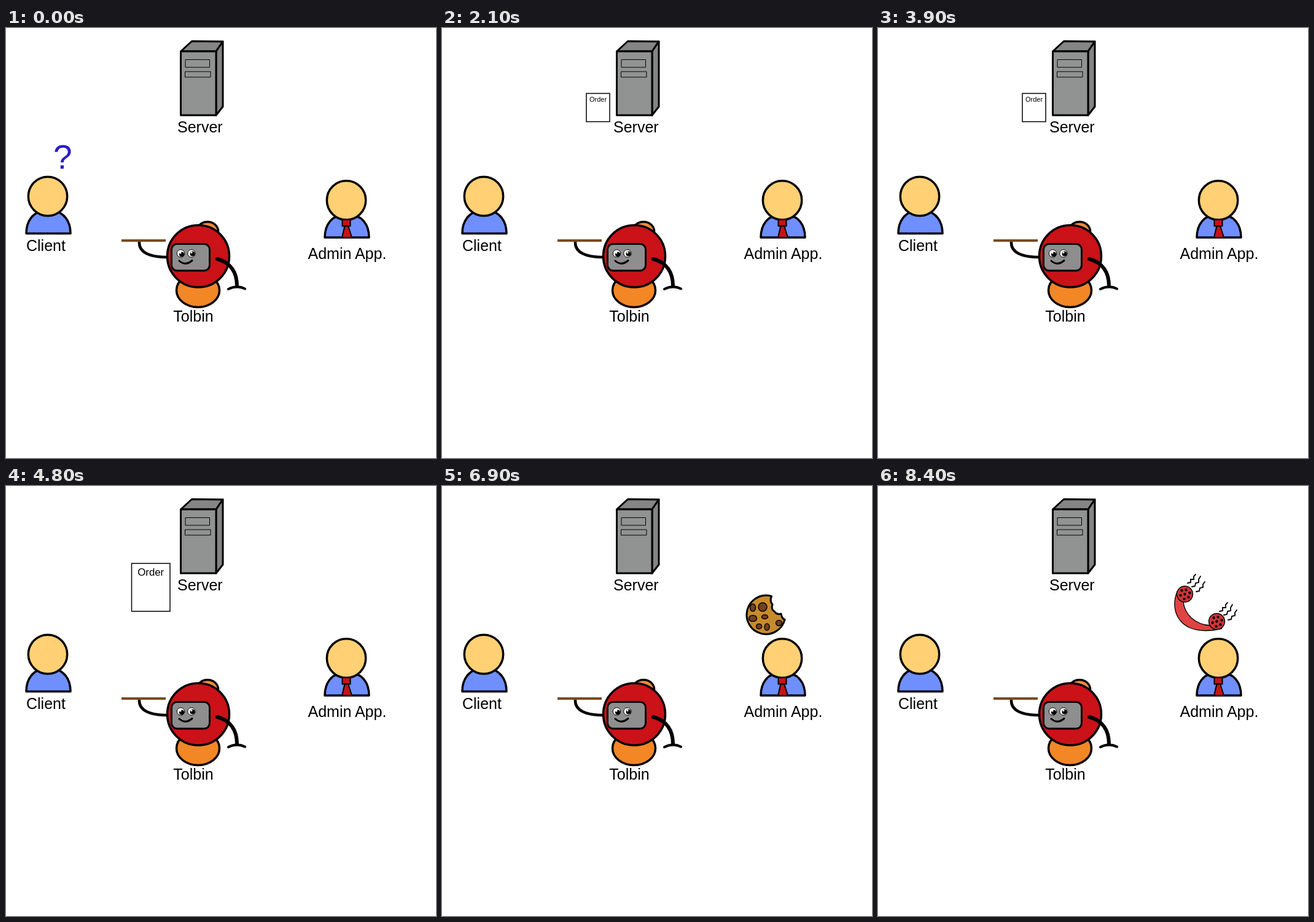
An HTML page for the animation above (8700 ms loop, 700x700 px).

```html
<!DOCTYPE html>
<html lang="en">
<head>
<meta charset="utf-8">
<title>Order service</title>
<style>
html, body { margin: 0; width: 100%; height: 100%; overflow: hidden; background: #fff; }
svg { display: block; width: 100vw; height: 100vh; }
text { font-family: "Liberation Sans", Arial, sans-serif; font-size: 25px; }
.ink { stroke: #000; stroke-width: 3.5; stroke-linejoin: round; }
.line { fill: none; stroke: #000; stroke-linecap: round; }
.thin { stroke: #000; stroke-width: 1.3; }
#ask { font-size: 55px; fill: #2a1ccb; }
</style>
</head>
<body>
<svg viewBox="0 0 700 700">
  <defs>
    <g id="person" class="ink">
      <path d="M33 334.5C33 316 42 297 69 297C96 297 105 316 105 334.5Z" fill="#6f8fff"/>
      <circle cx="68" cy="274" r="31.7" fill="#ffd074"/>
    </g>
    <g id="earpiece">
      <circle class="thin" r="13" fill="#cf3434"/>
      <path class="line" stroke-width="4.4" d="M-5 -6h0M2 -7h0M8 -2h0M-7 2h0M0 0h0M6 5h0M-1 8h0"/>
    </g>
    <path id="buzz" class="line" stroke-width="1.8"
      d="M0 0l5 -1l0 -5l5 0l0 -5l3 -3M7 6l5 -1l1 -5l5 -1l0 -5l3 -5M14 14l5 -1l1 -5l5 -1l0 -5l3 -4"/>
  </defs>

  <g class="ink" style="stroke-width:3">
    <path d="M284.500 38L302.500 21.500L353 22L342 38Z" fill="#858585"/>
    <path d="M342 38L353 22V128L342 142Z" fill="#858585"/>
    <path d="M284.500 38H342V142H284.500Z" fill="#919392"/>
  </g>
  <path class="thin" style="stroke-width:1" fill="none" d="M292 51.500h39.500v12.500h-39.500zM291.500 71h41.500v9h-41.500z"/>
  <text x="279" y="170">Server</text>

  <use href="#person"/>
  <text x="33" y="363">Client</text>

  <use href="#person" x="486" y="6.500"/>
  <path class="ink" style="stroke-width:2" fill="#c51218" d="M551.500 322h5.500l6 19h-16zM547.500 312h13v10.500h-13z"/>
  <text x="491.500" y="376">Admin App.</text>

  <g class="ink">
    <ellipse cx="328" cy="331" rx="17.500" ry="15.500" fill="#ee8a3c"/>
    <ellipse cx="312.500" cy="427" rx="35" ry="27.500" fill="#f38726"/>
    <circle cx="313" cy="371.500" r="50.500" fill="#ca1218"/>
    <rect x="269.500" y="351.500" width="62" height="43.500" rx="9" fill="#8e8e8e" stroke-width="3"/>
  </g>
  <g fill="#fff" stroke="#000" stroke-width="1">
    <circle cx="284.500" cy="367" r="6.200"/>
    <circle cx="302" cy="367" r="6.200"/>
  </g>
  <circle cx="286" cy="368.500" r="4"/>
  <circle cx="303.500" cy="367.500" r="4"/>
  <circle cx="284" cy="366" r="1.500" fill="#fff"/>
  <circle cx="302" cy="365.500" r="1.500" fill="#fff"/>
  <g class="line">
    <path stroke-width="3" d="M282 379Q292 388 303 378.500"/>
    <path stroke-width="4.500" d="M217 348C216 366 235 373 262 373"/>
    <path stroke-width="6" d="M344 376C366 382 376 398 376 420"/>
    <path stroke-width="4" d="M362 425Q376 418 389 424.500"/>
  </g>
  <path d="M188 346H260" stroke="#7a4a22" stroke-width="4"/>
  <text x="305" y="478" text-anchor="middle">Tolbin</text>

  <text id="ask">?</text>

  <g id="token">
    <circle class="ink" cx="7" cy="-4" r="32.500" style="stroke-width:3" fill="#f5a52c"/>
    <path id="ridges" class="line" stroke-width="2.500"/>
    <circle class="ink" r="32.300" style="stroke-width:3" fill="#fdb02f"/>
    <text x="-2.500" y="6" text-anchor="middle" style="font-size:16px">Token</text>
  </g>

  <g id="order">
    <rect id="sheet" class="thin" style="stroke-width:1.5" fill="#fff"/>
    <text id="title" text-anchor="middle">Order</text>
  </g>

  <g id="cookie">
    <path class="ink" style="stroke-width:3" fill="#c88b2c"
      d="M536.500 179.500A31.500 31.500 0 1 0 558 217.500Q553 216 552 208Q545 210 542 205Q535 201 538 193Q533 187 536.500 179.500Z"/>
    <g class="ink" style="stroke-width:1.5" fill="#70421a">
      <ellipse cx="522" cy="197" rx="7" ry="7"/>
      <ellipse cx="506" cy="198" rx="4.500" ry="6"/>
      <ellipse cx="506" cy="215.500" rx="6.500" ry="5"/>
      <ellipse cx="525.500" cy="213" rx="5" ry="3.500"/>
      <ellipse cx="516" cy="228.500" rx="4.500" ry="4"/>
      <ellipse cx="529" cy="229.500" rx="4" ry="5.500"/>
      <ellipse cx="548.500" cy="223" rx="5" ry="4.500"/>
    </g>
  </g>

  <g id="phone">
    <path class="thin" fill="#e04343" d="M487 172C473 206 494 248 560 232L541 227C516 226 498 208 497 187Z"/>
    <use href="#earpiece" x="499.500" y="176"/>
    <use href="#earpiece" x="551.500" y="220.500"/>
    <use href="#buzz" x="504" y="158"/>
    <use href="#buzz" x="556" y="204"/>
  </g>
</svg>
<script>
const STEP = 300, LOOP = 8700;
const $ = id => document.getElementById(id);
const mix = (a, b, k) => a + (b - a) * k;

// part, first ms, end ms, path start, path end, optional size range
const acts = [
  ['ask', 0, 900, [77, 229]],
  ['token', 900, 1800, [99, 184], [201, 104]],
  ['order', 2100, 4200, [235, 106.5], null, [0, 0]],
  ['ask', 2700, 3900, [256, 221]],
  ['order', 4200, 4800, [235, 106.5], [219.5, 116], [0, 0.5]],
  ['order', 4800, 5700, [204.5, 126], [193, 265], [1, 1]],
  ['ask', 5700, 6600, [370, 133]],
  ['cookie', 6600, 7500, [0, 0]],
  ['phone', 7500, 8700, [0, 0]]
];
const parts = ['ask', 'token', 'order', 'cookie', 'phone'];

let ridges = '';
for (let deg = -80; deg <= -5; deg += 12) {
  const a = deg * Math.PI / 180;
  ridges += `M${32.3 * Math.cos(a)} ${32.3 * Math.sin(a)}l7 -4`;
}
$('ridges').setAttribute('d', ridges);

function sizeOrder(k) {
  const w = mix(38, 62.5, k);
  $('sheet').setAttribute('width', w);
  $('sheet').setAttribute('height', mix(46, 78, k));
  $('title').setAttribute('x', w / 2);
  $('title').setAttribute('y', mix(13.5, 19.5, k));
  $('title').style.fontSize = mix(11, 16.8, k) + 'px';
}

function draw(t) {
  const seen = new Set();
  for (const [id, from, end, a, b, size] of acts) {
    if (t < from || t >= end) continue;
    const k = (t - from) / Math.max(STEP, end - from - STEP);
    const [x, y] = b ? a.map((v, i) => mix(v, b[i], k)) : a;
    $(id).setAttribute('transform', `translate(${x} ${y})`);
    if (size) sizeOrder(mix(...size, k));
    seen.add(id);
  }
  for (const id of parts) $(id).style.display = seen.has(id) ? '' : 'none';
}

const start = performance.now();
let last = -1;
function tick() {
  const t = Math.floor((performance.now() - start) % LOOP / STEP) * STEP;
  if (t !== last) draw(last = t);
  requestAnimationFrame(tick);
}
tick();
</script>
</body>
</html>
```
